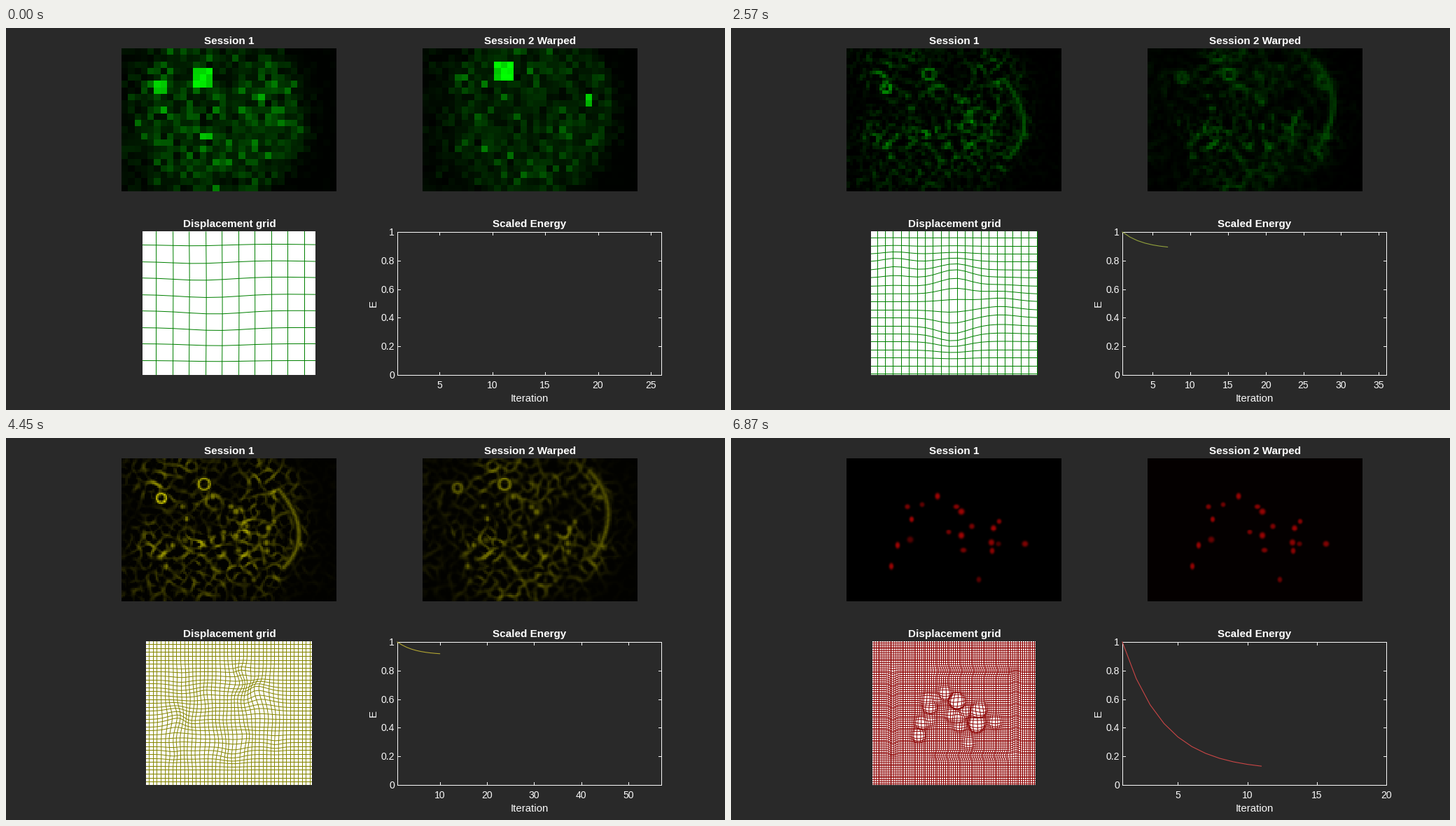
Write a matplotlib script that moves like this. It is 1027 px wide and 545 px high and loops after 7040 ms.

```python
import numpy as np
import matplotlib.pyplot as plt
from matplotlib.animation import FuncAnimation
from matplotlib.collections import LineCollection
from matplotlib.patches import Rectangle

W, H, DPI = 1027, 545, 64
PT = 72 / DPI                       # one pixel in points
LOOP, STEP = 7040, 40
IW, IH = 307, 205                   # picture size
LEFT, RIGHT, TOP, BOTTOM = 559, 936, 291, 495
INK = "#f8f8f8"
rng = np.random.default_rng(12)

plt.rcParams["font.family"] = "Liberation Sans"
fig = plt.figure(figsize=(W / DPI, H / DPI), dpi=DPI, facecolor="#292929")
ax = fig.add_axes([0, 0, 1, 1])
ax.axis("off")


# ---------- pictures ----------
def mesh_xy(w, h):
    y, x = np.mgrid[0:h, 0:w]
    return (x + .5) * IW / w, (y + .5) * IH / h


def blur(a, s):
    fy = np.fft.fftfreq(a.shape[0])[:, None]
    fx = np.fft.fftfreq(a.shape[1])[None, :]
    k = np.exp(-2 * (np.pi * s) ** 2 * (fx ** 2 + fy ** 2))
    return np.fft.ifft2(np.fft.fft2(a) * k).real


def noise(s):
    n = blur(rng.normal(size=PX.shape), s)
    return n / n.std()


def shrink(a, n):
    h, w = a.shape
    return a.reshape(h // n, n, w // n, n).mean((1, 3))


def ridges(n):
    gy, gx = np.gradient(n)
    gyy, gxy = np.gradient(gy)
    gxx = np.gradient(gx, axis=1)
    r = np.maximum(0, np.hypot((gxx - gyy) / 2, gxy) - (gxx + gyy) / 2)
    return np.clip(r / np.percentile(r, 98) - .12, 0, 1.2)


def sway(a, s):
    """Resample with a smooth shift of s cells."""
    h, w = a.shape
    y, x = np.mgrid[0:h, 0:w].astype(float)
    x = np.clip(x + s * np.sin(4 * y / h + 1), 0, w - 1.001)
    y = np.clip(y + s * np.cos(5 * x / w), 0, h - 1.001)
    i, j = y.astype(int), x.astype(int)
    v, u = y - i, x - j
    return ((a[i, j] * (1 - u) + a[i, j + 1] * u) * (1 - v)
            + (a[i + 1, j] * (1 - u) + a[i + 1, j + 1] * u) * v)


def arc(a, b, c, width=2.4):
    out = np.zeros(PX.shape)
    for t in np.linspace(0, 1, 40):
        x, y = ((1 - t) ** 2 * p + 2 * t * (1 - t) * q + t * t * r for p, q, r in zip(a, b, c))
        out = np.maximum(out, np.exp(-((PX - x) ** 2 + (PY - y) ** 2) / (2 * width ** 2)))
    return out


def ring(x, y, r):
    return np.exp(-((np.hypot(PX - x, PY - y) - r) / 2) ** 2)


def dots(places, light, x, y):
    out = np.zeros(x.shape)
    for (cx, cy), v, (a, b) in zip(places, light, SIZES):
        out = np.maximum(out, v * np.exp(-(((x - cx) / a) ** 2 + ((y - cy) / b) ** 2) ** 1.5))
    return out


CELLS = np.array([
    (130, 54), (108, 66), (87, 69), (157, 69), (164, 76), (93, 87), (218, 90),
    (179, 97), (210, 100), (146, 106), (164, 111), (91, 117), (73, 125), (207, 121),
    (217, 123), (255, 123), (167, 132), (208, 133), (64, 155), (189, 174)], float)
LIGHT = .3 + .35 * np.abs(np.sin(CELLS[:, 0] * CELLS[:, 1]))
SIZES = rng.uniform(3.3, 4.8, (len(CELLS), 2))
DRIFT = rng.normal(0, 2.5, CELLS.shape)
PX, PY = mesh_xy(132, 88)
DX, DY = mesh_xy(IW, IH)


def scene(n, cx, eye, glow, rim):
    d = np.hypot((PX - cx) / 116, (PY - 95) / 120)
    inside = 1 / (1 + np.exp(14 * (d - 1)))
    west = 1 / (1 + np.exp((PX - 150) / 25))
    env = np.clip(inside + .3 * west + .06, 0, 1)
    f = .44 * env * ridges(n) * np.clip(.75 + .3 * noise(6), .25, 1.3)
    for part in (.4 * arc(*rim), glow * ring(*eye, 6.5), .62 * ring(118, 37, 8),
                 .8 * dots(CELLS, LIGHT, PX, PY)):
        f = np.maximum(f, part)
    return f, env


def coarse(f, env, grain, spots):
    e = shrink(env, 4)
    v = e * (rng.gamma(1.5, grain, e.shape) + .55 * shrink(f, 4) + .02)
    v = np.clip(v, .01, .48)
    x, y = mesh_xy(33, 22)
    for cx, cy, r, b in spots:
        near = np.maximum(abs(x - cx), abs(y - cy)) < r
        v[near] = b * rng.uniform(.85, 1.15, near.sum())
    return v


base = noise(1.45)
fine1, env1 = scene(base, 146, (57, 57), .8, ((225, 45), (278, 110), (232, 156)))
fine2, env2 = scene(.8 * base + .6 * noise(1.45), 156, (51, 43), .5,
                    ((240, 18), (290, 72), (244, 140)))
big1 = coarse(fine1, env1, .085, [(118, 42, 14, .85), (56, 56, 9, .74), (200, 72, 6, .62),
                                  (60, 88, 5, .7), (121, 125, 6, .7)])
big2 = coarse(fine2, env2, .055, [(116, 36, 14, .9), (55, 42, 9, .4), (237, 74, 6, .72)])
GREEN, YELLOW, RED = (0, 1, 0), (.92, .9, 0), (.95, .02, .02)


def tint(v, rgb):
    return np.clip(v[..., None] * np.array(rgb), 0, 1)


def pair(a, b, rgb):
    return lambda i: (tint(a, rgb), tint(sway(b, .5 * (1 - np.exp(-.25 * (i - 1)))), rgb))


def red_pair(i):
    moved = CELLS + DRIFT * np.exp(-.45 * i)
    floor = .015 + .03 * np.exp(-.2 * i)
    return (tint(dots(CELLS, LIGHT, DX, DY), RED),
            tint(np.maximum(dots(moved, .2 + .65 * LIGHT, DX, DY), floor), RED))


# ---------- displacement of the grids ----------
def bumps(spec):
    """Each bump: x, y, size, push right, push down."""
    def field(x, y):
        out = np.zeros(x.shape + (2,))
        for cx, cy, size, *push in spec:
            g = np.exp(-((x - cx) ** 2 + (y - cy) ** 2) / (2 * size ** 2))
            out += g[..., None] * np.array(push)
        return out
    return field


def swells(x, y):
    """Swelling at every cell, and a bent frame where the picture ends."""
    x0, y0, x1, y1 = 231, 332, 407, 453
    dx, dy = np.zeros_like(x), np.zeros_like(x)
    for (cx, cy), v in zip(CELLS, LIGHT):
        u = x - x0 - cx * (x1 - x0) / IW
        w = y - y0 - cy * (y1 - y0) / IH
        g = 1.5 * v * np.exp(-(u * u + w * w) / 49)
        dx, dy = dx + g * u, dy + g * (w + 2)
    bell = lambda d: np.exp(-(d / 5) ** 2)
    span = lambda v, a, b: 1 / (1 + np.exp((a - v) / 3) + np.exp((v - b) / 3))
    dy += (4 * bell(x - x0) - 3 * bell(x - x1)) * span(y, y0, y1)
    dx += 3 * (bell(y - y0) - bell(y - y1)) * span(x, 290, 398)
    return np.dstack([dx, dy])


wide = bumps([(268, 347, 32, 2, 8), (302, 412, 40, 2, 15), (382, 340, 42, 0, -5)])
medium = bumps([(320, 362, 22, 0, -9), (316, 428, 21, 0, 8), (235, 340, 17, 0, -4),
                (385, 398, 23, 0, -4)])
small = bumps([(*rng.uniform((230, 335), (386, 452)), rng.uniform(8, 13), *rng.normal(0, 2.4, 2))
               for _ in range(44)])


class Stage:
    def __init__(self, start, end, count, first, last, tick, size, gap, ink,
                 field, gain, rate, curve_ink, floor, fall, pictures):
        self.times, self.first, self.last = np.linspace(start, end, count), first, last
        self.ink, self.gain, self.rate = ink, gain, rate
        self.curve_ink, self.floor, self.fall = curve_ink, floor, fall
        self.pictures = pictures
        self.box = x0, y0, x1, y1 = 318.5 - size / 2, 290, 318.5 + size / 2, 495
        xs = np.floor(np.arange(x0 + .85 * gap, x1, gap)) + .5
        ys = np.floor(np.arange(y0 + .85 * gap, y1, gap)) + .5
        self.rows = np.dstack(np.meshgrid(np.r_[x0, xs, x1], ys))
        self.cols = np.dstack(np.meshgrid(xs, np.r_[y0, ys, y1])).swapaxes(0, 1)
        self.moves = [field(g[..., 0], g[..., 1]) for g in (self.rows, self.cols)]
        self.marks = []
        for t in range(tick, last + 1, tick):
            x = self.x(t)
            for y, d in ((BOTTOM, -4), (TOP, 4)):
                self.marks += ax.plot([x, x], [y, y + d], color=INK, lw=PT)
            self.marks.append(ax.text(x, 514, str(t), color=INK, fontsize=14 * PT, ha="center"))

    def x(self, i):
        return LEFT + (i - 1) * (RIGHT - LEFT) / (self.last - 1)

    def y(self, i):
        e = self.floor + (1 - self.floor) * np.exp(-self.fall * (i - 1))
        return BOTTOM - (BOTTOM - TOP) * e

    def lines(self, i):
        s = self.gain * (1 - np.exp(-self.rate * i))
        return [*(self.rows + s * self.moves[0]), *(self.cols + s * self.moves[1])]


STAGES = [
    Stage(350, 1550, 8, 1, 26, 5, 247, 23.5, "#008000", wide, 1.58, .2,
          "#5f8a35", .915, .42, pair(big1, big2, GREEN)),
    Stage(1720, 2910, 8, 2, 36, 5, 238, 11.4, "#008000", medium, 1.43, .4,
          "#93a23c", .88, .35, pair(.9 * shrink(fine1, 2), .85 * shrink(fine2, 2), GREEN)),
    Stage(3080, 4970, 12, 2, 57, 10, 237, 5.6, "#858500", small, 1.02, .38,
          "#b3a632", .91, .27, pair(fine1 + .01, .9 * fine2 + .01, YELLOW)),
    Stage(5180, 6870, 11, 1, 20, 5, 233, 2.83, "#8c0000", swells, 1.03, .3,
          "#cc4646", .1, .335, red_pair)]
# the opening picture holds, then one iteration every 170 ms after a pause
STAGES[0].times = np.r_[0, 330, np.arange(700, 1551, 170)]
TIMELINE = [(t, st, st.first + k) for st in STAGES for k, t in enumerate(st.times)]

# ---------- fixed parts ----------
for x, y, s in [(319, 23, "Session 1"), (749, 23, "Session 2 Warped"),
                (319, 284, "Displacement grid"), (748, 284, "Scaled Energy")]:
    ax.text(x, y, s, color="white", weight="bold", fontsize=15.3 * PT, ha="center")
ax.text(748, 533, "Iteration", color=INK, fontsize=15 * PT, ha="center")
ax.text(524.5, 392.5, "E", color=INK, fontsize=15 * PT, ha="center", va="center", rotation=90)
ax.add_patch(Rectangle((LEFT, TOP), RIGHT - LEFT, BOTTOM - TOP, fill=False, ec=INK, lw=PT))
for k in range(6):
    y = BOTTOM - k * (BOTTOM - TOP) / 5
    ax.text(555, y + 5, f"{k / 5:g}", color=INK, fontsize=14 * PT, ha="right")
    for x, d in ((LEFT, 4), (RIGHT, -4)):
        ax.plot([x, x + d], [y, y], color=INK, lw=PT)

pics = [ax.imshow(np.zeros((2, 2, 3)), extent=(x, x + IW, 29 + IH - 1, 29), aspect="auto",
                  interpolation="nearest") for x in (165, 595)]
ax.set_xlim(0, W)
ax.set_ylim(H, 0)
paper = ax.add_patch(Rectangle((0, 0), 1, 1, fc="white", ec="none"))
mesh = ax.add_collection(LineCollection([], zorder=3, linewidths=PT), autolim=False)
mesh.set_snap(False)
trace, = ax.plot([], [], lw=1.1 * PT, zorder=4)


def draw(frame):
    now = frame * STEP + 30
    _, st, i = [row for row in TIMELINE if row[0] <= now][-1]
    for pic, data in zip(pics, st.pictures(i)):
        pic.set_data(data)
    x0, y0, x1, y1 = st.box
    paper.set_bounds(x0, y0, x1 - x0, y1 - y0)
    mesh.set_segments(st.lines(i))
    mesh.set_color(st.ink)
    mesh.set_clip_path(paper)
    its = np.arange(1, i + 1)
    trace.set_data(st.x(its), st.y(its))
    trace.set_color(st.curve_ink)
    trace.set_visible(i > 1)
    for other in STAGES:
        for m in other.marks:
            m.set_visible(other is st)
    return []


anim = FuncAnimation(fig, draw, frames=LOOP // STEP, interval=STEP,
                     repeat=True, repeat_delay=0, blit=False)
plt.show()
```
